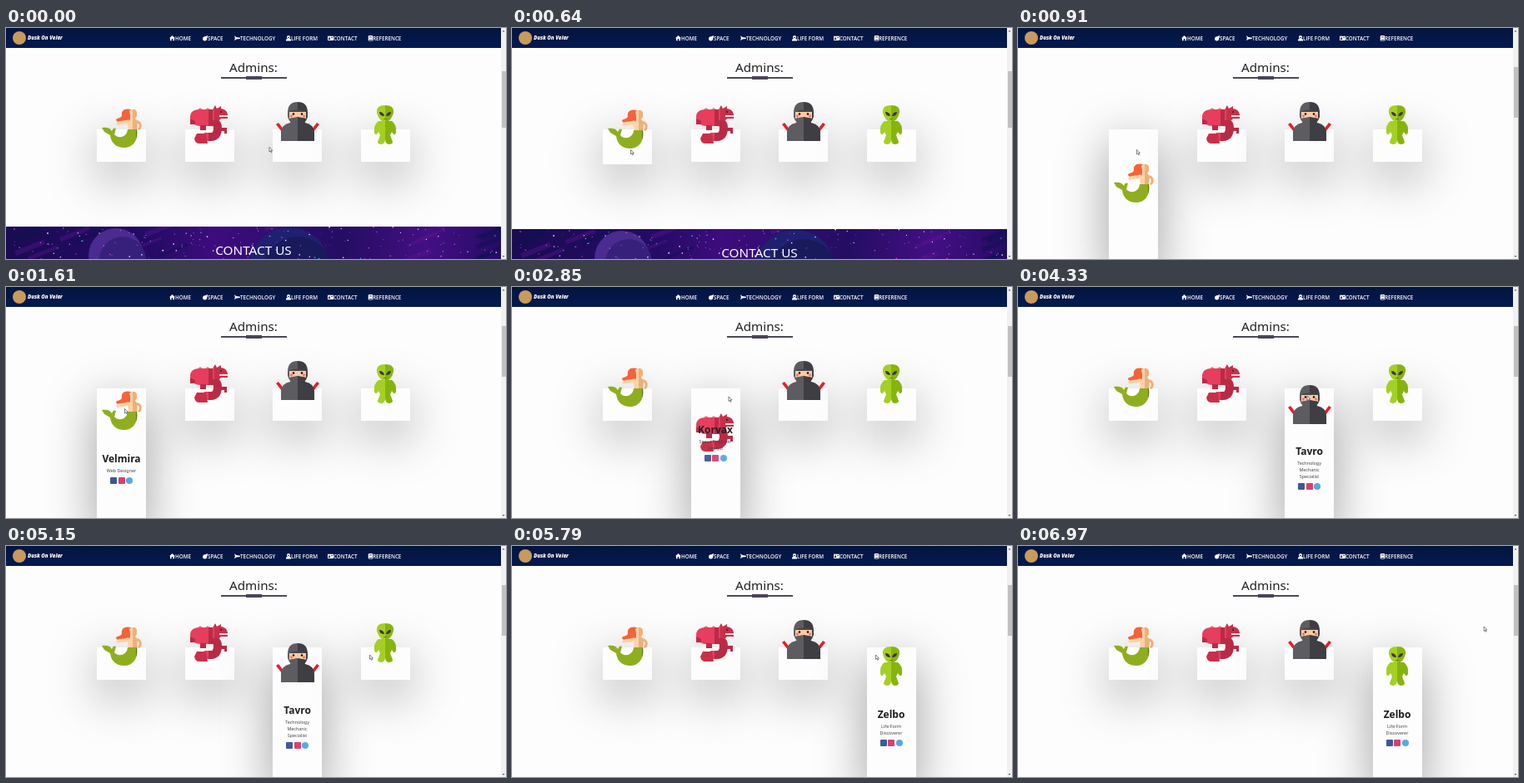
An HTML page with a canvas that plays this animation: 600x278 px, repeating every 7 s.

```html
<!DOCTYPE html>
<html lang="en">
<head>
<meta charset="utf-8">
<title>Admins</title>
<style>
html, body { margin: 0; width: 100%; height: 100%; overflow: hidden; }
#stage { position: relative; width: 600px; height: 278px; overflow: hidden; background: #fdfdfd; font-family: "Noto Sans", "Open Sans", sans-serif; color: #222; }
#stage > *, .card > * { position: absolute; }
svg { overflow: visible; }
nav { z-index: 3; left: 0; top: 0; width: 594px; height: 23.5px; background: linear-gradient(#04143f, #031a50); color: #fff; }
nav text { font: 600 6.3px "Open Sans", "Noto Sans", sans-serif; fill: #fff; }
nav .brand { font: italic 800 6.1px "Open Sans", "Noto Sans", sans-serif; }
h1 { margin: 0; left: 197px; top: 36px; width: 200px; text-align: center; font-size: 15.2px; font-weight: 500; line-height: 22px; }
.rule { left: 258px; top: 59.2px; width: 79px; height: 1.8px; background: #4c4954; }
.rule::after { content: ""; position: absolute; left: 30px; top: -1.2px; width: 19px; height: 4px; background: #4b4356; }
.card { top: 122px; width: 59px; background: #fdfdfd; box-shadow: 0 16px 60px rgba(0, 0, 0, .38); }
.card svg { left: 5.5px; }
.info { left: -10px; width: 79px; text-align: center; font-size: 5.4px; line-height: 8px; color: #444; }
.info b { display: block; height: 18px; font-size: 12px; font-weight: 600; line-height: 16px; color: #1c1c1c; }
.info i { display: inline-block; width: 8px; height: 8px; margin: 4px .75px 0; border-radius: 1px; }
#contact { left: 0; width: 594px; height: 60px; }
#contact canvas { position: absolute; left: 0; top: 0; }
#contact p { position: absolute; margin: 0; left: 0; top: 17px; width: 594px; text-align: center; font-size: 15.3px; font-weight: 500; line-height: 22px; color: #fff; }
#bar { z-index: 4; left: 594px; top: 0; width: 6px; height: 278px; background: #f1f1f1; }
#bar i { position: absolute; left: .5px; width: 5px; background: #c1c1c1; }
#bar svg { position: absolute; }
#cursor { z-index: 5; left: 0; top: 0; }
</style>
</head>
<body>
<div id="stage">
  <h1>Admins:</h1>
  <div class="rule"></div>
  <div id="contact"><canvas width="594" height="60"></canvas><p>CONTACT US</p></div>
  <nav>
    <svg width="594" height="23">
      <circle cx="16" cy="12" r="8" fill="#c99a5b"/>
      <text class="brand" x="26" y="14">Dusk On Velar</text>
      <g id="menu" fill="#fff"></g>
    </svg>
  </nav>
  <div id="bar">
    <i></i>
    <svg width="6" height="278" fill="#666"><path d="M1.5 4.5L3 2.5L4.5 4.5ZM1.5 274L3 276L4.5 274Z"/></svg>
  </div>
  <svg id="cursor" width="5" height="7"><path d="M0 0V5.4L1.3 4.3L2.2 6.3L3.1 5.9L2.2 3.9H3.8Z" fill="#fff" stroke="#222" stroke-width=".55"/></svg>
</div>
<script>
const LOOP = 7000, STEP = 300, GROW = 132, GAP = 76;
const $ = s => document.querySelector(s);

// Menu: icon x, label x, label, icon path around (0,0)
const menu = [
  [199.5, 203, 'HOME', 'M-3.5 0L0-3.2L3.5 0H2.5V3H.8V.8H-.8V3H-2.5V0Z'],
  [239, 242, 'SPACE', 'M-3 .5A2.6 2.6 0 1 0 2.2 .5L3.2-3.2L0-2A2.6 2.6 0 0 0-3 .5Z'],
  [277.5, 281, 'TECHNOLOGY', 'M-3.5-3L-1-1.2L3.5-.6V.6L-1 1.2L-3.5 3L-2.6 0Z'],
  [339, 342, 'LIFE FORM', 'M-2-1.2A2 2 0 1 1 2-1.2A2 2 0 0 1 1.2 .6L3 1.5V3.2H-3V1.5L-1.2 .6A2 2 0 0 1-2-1.2ZM-1-1.2A1 .9 0 1 0 1-1.2Z'],
  [389.5, 393, 'CONTACT', 'M-3.5-2.6H3.5V2.6H-3.5ZM-2.7 1.6H-.3V.6L-1 .3V-1.2H-2V.3L-2.7 .6ZM.6-1.2V-.5H2.7V-1.2Z'],
  [437.3, 440, 'REFERENCE', 'M-2.6-2.4L-1.8-3.2H2.6V3.2H-1.8L-2.6 2.4ZM-1.4-1.8V-1H1.6V-1.8ZM-1.5 1.7V2.4H2V1.7Z']
];
$('#menu').innerHTML = menu.map(([ix, tx, label, d]) =>
  `<path transform="translate(${ix} 12.3)" fill-rule="evenodd" d="${d}"/><text x="${tx}" y="14.7">${label}</text>`).join('');

// Two flat tones meeting at x
const tones = (id, x, a, b) => `<linearGradient id="${id}" gradientUnits="userSpaceOnUse" x1="${x}" x2="${x + .1}" y1="0" y2="0"><stop stop-color="${a}"/><stop offset="1" stop-color="${b}"/></linearGradient>`;

const swimmer = tones('tail', 41, '#8fae1f', '#5c7a12') + tones('skin', 37, '#fbd3a8', '#efb078') +
  `<path d="M35 1C27-1 23 3 24 8C24 12 17 11 17 14C19 18 30 18 34 14Z" fill="#f4633a"/>
  <path d="M32 13C27 16 20 13 17 18L19 20C23 18 28 20 33 17Z" fill="#fbd3a8"/>
  <path d="M43 14C47 16 49 19 47 24L45 26L43 25C46 21 45 18 42 17Z" fill="#efb078"/>
  <path d="M33 3C35 0 41 0 42 4V9L40 12L43 15L42 27H32L31 16L35 12Z" fill="url(#skin)"/>
  <path d="M31 25H42C44 37 38 47 27 47C17 47 11 41 10 32L3 28L0 23C6 22 10 23 12 27C14 23 14 23 17 24L15 31C18 36 30 36 31 25Z" fill="url(#tail)"/>`;

const serpent = tones('red', 23, '#e63e5c', '#b92b45') + tones('red2', 30, '#e63e5c', '#c8304a') +
  `<path d="M33 10H12Q6 10 6 14Q6 20 14 20H27Q34 20 34 27Q34 38 26 38H18" fill="none" stroke="url(#red)" stroke-width="10"/>
  <path d="M20 34H9L6 40Q7 46 12 46H22Z" fill="#c8304a"/>
  <path d="M1 16V23H7V19ZM13 24V30H20V24ZM36 27H45V34H42V31H35Z" fill="#b92b45"/>
  <path d="M28 5L31 0L33 4L38 1L38 4Q45 5 46 11V16H38L36 18H28Z" fill="url(#red2)"/>
  <path d="M36 12H46V14H36Z" fill="#ffd8d8"/><circle cx="38" cy="8" r="1.2" fill="#432"/>
  <path d="M10 5L13 3L16 5M19 5L22 3L25 5" fill="#f67b86"/>`;

const fighter = tones('cloth', 24, '#5d5d61', '#3e3e43') +
  `<path d="M-2 27L1 25L8 34L5 36ZM50 27L47 25L40 34L43 36Z" fill="#e3202c"/>
  <path d="M4 47V36Q5 27 15 25H33Q43 27 44 36V47Z" fill="url(#cloth)"/>
  <path d="M12 13Q12 0 24 0Q36 0 36 13V18Q33 28 24 28Q15 28 12 18Z" fill="url(#cloth)"/>
  <path d="M14 11H34V20L24 18L14 20Z" fill="#fbc9a4"/><path d="M14 11Q24 8 34 11V12H14Z" fill="#48484c"/>
  <path d="M14 20Q24 17 34 20L32 27Q24 32 16 27Z" fill="url(#cloth)"/>
  <circle cx="19" cy="14.5" r="1.2"/><circle cx="29" cy="14.5" r="1.2"/>
  <circle cx="16.5" cy="17" r="1.4" fill="#ee6b62"/><circle cx="31.5" cy="17" r="1.4" fill="#ee6b62"/>`;

const visitor = tones('lime', 24, '#a4cf24', '#86b40e') +
  `<path d="M16 19Q10 23 11 33Q13 38 16 32L18 36L15 44Q15 47 20 47Q24 46 24 41Q24 46 28 47Q33 47 33 44L30 36L32 32Q35 38 37 33Q38 23 32 19Z" fill="url(#lime)"/>
  <path d="M24 0Q35 0 34 9Q32 18 24 21Q16 18 14 9Q13 0 24 0Z" fill="url(#lime)"/>
  <path d="M17 8Q22 8 23 13Q17 13 17 8ZM31 8Q26 8 25 13Q31 13 31 8Z" fill="#43304d"/>
  <path d="M22 16.5H26" stroke="#5b7c0c" stroke-width=".8"/>`;

// Each card opens and closes at the given times
const cards = [
  { name: 'Velmira', role: ['Web Designer'], icon: swimmer, open: 615, close: 2420 },
  { name: 'Korvax', role: ['Space Engineer', 'Analyst'], icon: serpent, open: 2468, close: 3642 },
  { name: 'Tavro', role: ['Technology', 'Mechanic', 'Specialist'], icon: fighter, open: 3758, close: 5130 },
  { name: 'Zelbo', role: ['Life Form', 'Discoverer'], icon: visitor, open: 5150, close: Infinity }
];
cards.forEach((c, i) => {
  c.el = document.createElement('div');
  c.el.className = 'card';
  c.el.style.left = 109 + 105.5 * i + 'px';
  c.el.innerHTML = `<svg width="48" height="47">${c.icon}</svg><div class="info"><b>${c.name}</b>${c.role.join('<br>')}<br>` +
    '<i style="background:#3b5998"></i><i style="background:#d8406c"></i><i style="background:#55a8e4;border-radius:50%"></i></div>';
  $('#stage').insertBefore(c.el, $('#contact'));
  [c.svg, c.info] = c.el.children;
  c.shift = (2 - c.role.length) * 4;
});

function paintSky() {
  const g = $('canvas').getContext('2d');
  let seed = 11;
  const rnd = () => (seed = seed * 16807 % 2147483647) / 2147483647;
  const disc = (x, y, r, fill) => {
    g.fillStyle = fill;
    g.beginPath();
    g.arc(x, y, r, 0, 7);
    g.fill();
  };
  const sky = g.createLinearGradient(0, 0, 594, 30);
  [[0, '#1a0b52'], [.3, '#250b66'], [.42, '#3d0c7d'], [.68, '#240d63'], [.85, '#430f83'], [1, '#260b66']].forEach(s => sky.addColorStop(...s));
  g.fillStyle = sky;
  g.fillRect(0, 0, 594, 60);
  for (let i = 0; i < 26; i++) {
    const x = rnd() * 594, y = rnd() * 45;
    g.strokeStyle = i % 2 ? '#5a169066' : '#10124f88';
    g.lineWidth = 3 + rnd() * 4;
    g.beginPath();
    g.moveTo(x, y);
    g.lineTo(x + 35, y - 14);
    g.stroke();
  }
  disc(132, 35, 33, '#4b2a92');
  disc(140, 40, 28, '#37207c');
  disc(340, 49, 48, '#202070');
  disc(350, 54, 42, '#191a5c');
  for (let i = 0; i < 190; i++)
    disc(rnd() * 594, rnd() * 45, .3 + rnd() * .6, ['#e9d5ff', '#a45be0', '#41a4d8', '#d452c9'][i % 4]);
}
paintSky();

const ease = t => (t = Math.min(1, Math.max(0, t)), t * t * (3 - 2 * t));
const path = [
  [0, 316, 143.5], [60, 316, 143.5], [560, 142.5, 146.5], [2250, 142.5, 146.5], [2500, 260, 132], [3500, 260, 132],
  [3800, 347, 131], [4930, 347, 131], [5120, 436.5, 131], [6770, 436.5, 131], [6965, 559, 97], [LOOP, 559, 97]
];

function pointer(t) {
  const i = path.findIndex(p => p[0] > t), [t0, x0, y0] = path[i - 1], [t1, x1, y1] = path[i];
  const k = ease((t - t0) / (t1 - t0));
  return [x0 + (x1 - x0) * k, y0 + (y1 - y0) * k];
}

function draw(t) {
  let tallest = 0;
  for (const c of cards) {
    const closing = t > c.close, shut = 1 - ease((t - c.close) / STEP);
    // the card grows first, then its contents spread apart
    const grow = closing ? shut : ease((t - c.open) / STEP);
    const spread = closing ? shut : ease((t - c.open - STEP) / STEP);
    tallest = Math.max(tallest, grow);
    c.el.style.height = 39 + GROW * grow + 'px';
    c.svg.style.top = -29 + c.shift + (GROW * grow - GAP * spread) / 2 + 'px';
    c.info.style.top = 73 + c.shift - (GROW * (1 - grow) + GAP * (1 - spread)) / 2 + 'px';
    c.info.style.opacity = closing ? Math.max(0, (spread - .3) / .7) : Math.min(1, spread * 5);
  }
  $('#contact').style.top = 239 + GROW * tallest + 'px';
  const thumb = $('#bar i').style;
  thumb.top = 52 - 5 * tallest + 'px';
  thumb.height = 68 - 7 * tallest + 'px';
  $('#cursor').style.transform = `translate(${pointer(t).map(v => v + 'px')})`;
}

function tick() {
  draw(performance.now() % LOOP);
  requestAnimationFrame(tick);
}
tick();
</script>
</body>
</html>
```
